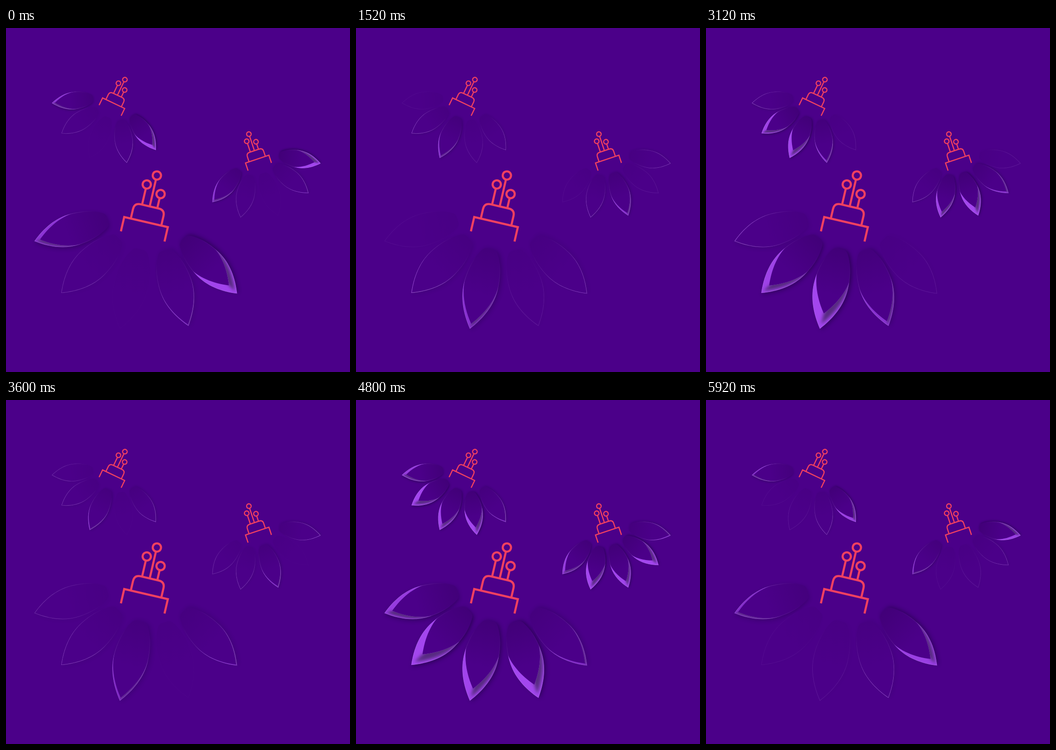
An HTML page with a canvas for the animation above (6 s loop, 748 by 748 pixels).

```html
<!DOCTYPE html>
<html lang="en">
<head>
<meta charset="utf-8">
<title>Flowers</title>
<style>
html, body { margin: 0; width: 100%; height: 100%; overflow: hidden; background: #4b0089; }
canvas { display: block; width: 748px; height: 748px; }
</style>
</head>
<body>
<canvas id="stage" width="748" height="748"></canvas>
<script>
const ctx = document.getElementById('stage').getContext('2d');
const BG = '#4b0089', LIGHT = '#a346ee', SHADE = '#572b81', CORAL = '#f04060';
const STEP = 80, LOOP = 6000, PERIOD = 2000, LENGTH = 172;
const RAD = Math.PI / 180;

// tilt turns the fan of petals against the head
const FLOWERS = [
  { x: 304.5, y: 422, turn: 13.1, size: 1, tilt: 1.4 },
  { x: 234, y: 163.5, turn: 25.6, size: 0.546, tilt: -1.3 },
  { x: 546.2, y: 285, turn: -18.4, size: 0.55, tilt: -1.3 }
];

// One half outline, side -1 or 1; the tip is at the origin, the base straight up
function halfPetal(side) {
  const x = v => v * side;
  return `C${x(22)} -28 ${x(37)} -60 ${x(36)} -95` +
    `C${x(35)} -128 ${x(27)} -150 ${x(17)} -166Q${x(13)} -172 ${x(7)} -172H0Z`;
}
const RIGHT_HALF = new Path2D('M0 0' + halfPetal(1));
const PETAL = new Path2D(
  'M0 0' + halfPetal(-1).replace('H0Z', 'H7') +
  'Q13 -172 17 -166C27 -150 35 -128 36 -95C37 -60 22 -28 0 0Z');

function fade(rgb, a0, a1, y0, y1) {
  const g = ctx.createLinearGradient(0, y0, 0, y1);
  g.addColorStop(0, `rgba(${rgb}, ${a0})`);
  g.addColorStop(1, `rgba(${rgb}, ${a1})`);
  return g;
}

function drawPetal(s) {
  const depth = 34 * Math.pow(s, 1.8);
  const m = ctx.getTransform(), k = Math.hypot(m.a, m.b);

  // Soft shadow on the right side
  ctx.save();
  ctx.shadowColor = `rgba(24, 0, 56, ${0.55 * s})`;
  ctx.shadowBlur = 9 * k;
  ctx.shadowOffsetX = m.a * 4;
  ctx.shadowOffsetY = m.b * 4;
  ctx.fillStyle = BG;
  ctx.fill(PETAL);
  ctx.restore();

  ctx.globalAlpha = Math.min(1, 0.25 + s);
  ctx.fillStyle = fade('62, 0, 114', 0, 0.7, -75, -LENGTH);
  ctx.fill(PETAL);
  ctx.clip(PETAL);

  // Raised rim: the petal minus a copy slid towards the base
  ctx.save();
  const hole = new Path2D();
  hole.rect(-300, -500, 600, 800);
  hole.addPath(PETAL, new DOMMatrix([1, 0, 0, 1, 0, -depth]));
  ctx.clip(hole, 'evenodd');
  ctx.globalAlpha = Math.min(1, 0.25 + 0.85 * s) * Math.min(1, s * 8);
  ctx.fillStyle = LIGHT;
  ctx.fill(PETAL);
  ctx.filter = `blur(${(0.8 + 3 * s) * k}px)`;
  ctx.globalAlpha = Math.min(1, s * 3);
  ctx.translate(0, -depth * 0.3);
  ctx.fillStyle = SHADE;
  ctx.fill(RIGHT_HALF);
  ctx.restore();

  // Hairline that stays while the petal is almost flat
  ctx.globalAlpha = Math.min(0.4, s * 6);
  ctx.strokeStyle = fade('180, 130, 220', 1, 0, -60, -150);
  ctx.lineWidth = 1.6 / k;
  ctx.stroke(PETAL);
}

// Petals rise one after another, from the outer ones inwards
function rise(i, t) {
  const rank = i < 2 ? 2 * i + 1 : 8 - 2 * i;
  const peak = 0.12 + 0.1 * rank;
  return 0.5 + 0.5 * Math.cos(2 * Math.PI * (t / PERIOD - peak));
}

// Tips lie on a circle; outer petals are closer together and shorter
function drawFan(t) {
  for (let i = 0; i < 5; i++) {
    const j = i - 2, dist = Math.abs(j);
    const angle = j * (36.4 - 2.6 * dist) * RAD;
    const k = (179 - 6.5 * dist) / LENGTH;
    ctx.save();
    ctx.translate(3 + 257 * Math.sin(angle), -18 + 257 * Math.cos(angle));
    ctx.rotate(-0.947 * angle);
    ctx.scale(k, k);
    drawPetal(rise(i, t));
    ctx.restore();
  }
}

function drawHead() {
  ctx.strokeStyle = CORAL;
  ctx.lineWidth = 4.6;
  ctx.stroke(new Path2D(
    'M-48.7 32V0H48.7V32M-34 0V-21Q-34 -35 -20 -35H20Q34 -35 34 -21V0'));
  for (const [x, y] of [[0, -104], [-17, -80], [17, -66.5]]) {
    ctx.beginPath();
    ctx.arc(x, y, 9, 0, 2 * Math.PI);
    ctx.moveTo(x, y + 9);
    ctx.lineTo(x, -35);
    ctx.stroke();
  }
}

function draw(now) {
  const t = Math.floor((now % LOOP) / STEP) * STEP;
  ctx.fillStyle = BG;
  ctx.fillRect(0, 0, 748, 748);
  for (const f of FLOWERS) {
    ctx.save();
    ctx.translate(f.x, f.y);
    ctx.rotate(f.turn * RAD);
    ctx.scale(f.size, f.size);
    ctx.save();
    ctx.rotate(f.tilt * RAD);
    drawFan(t);
    ctx.restore();
    drawHead();
    ctx.restore();
  }
}

const start = performance.now();
function tick() {
  draw(performance.now() - start);
  requestAnimationFrame(tick);
}
tick();
</script>
</body>
</html>
```
